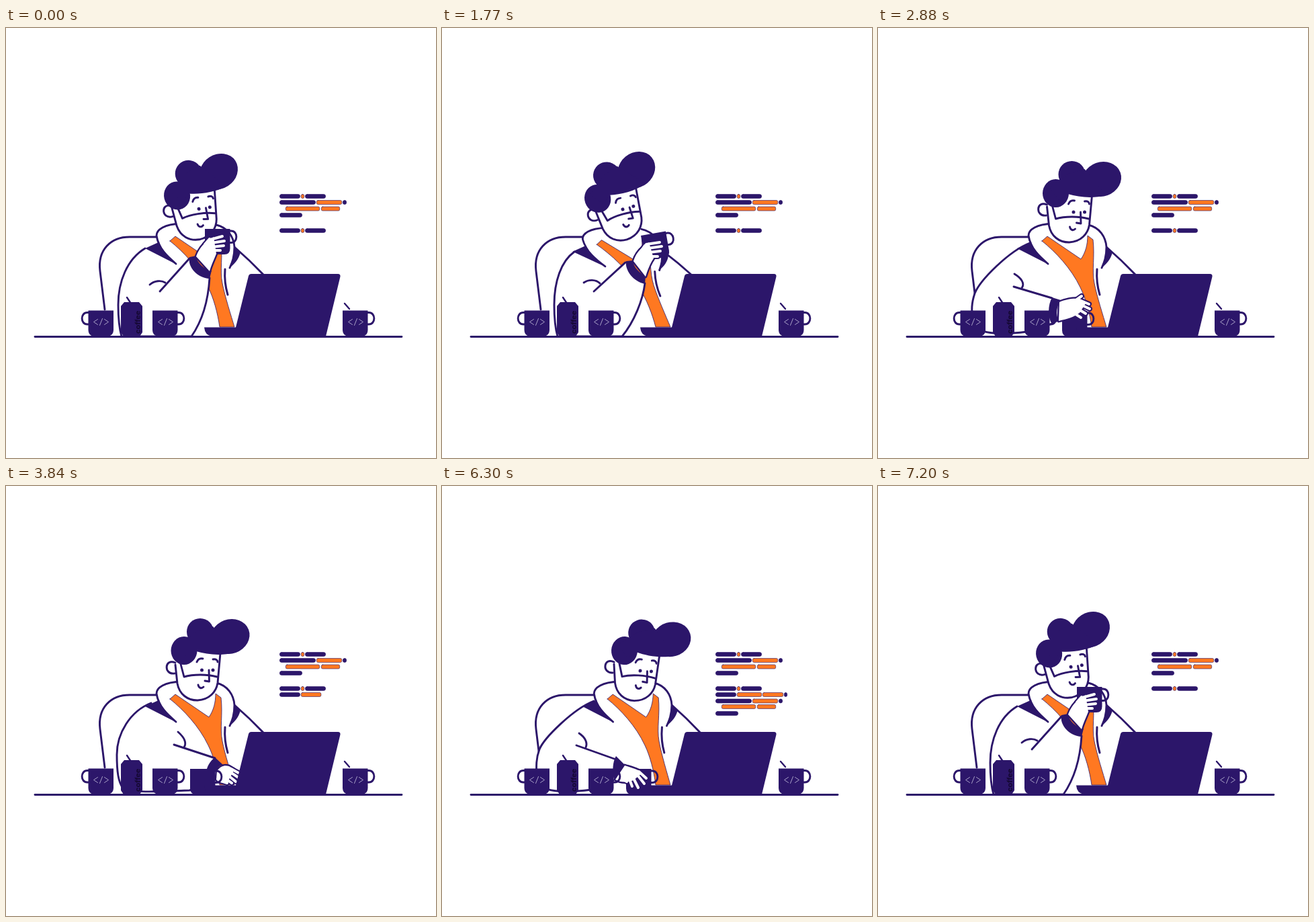
These frames come from a looping animation (640x640 px, 7.23 s). An HTML page with a canvas:

```html
<!DOCTYPE html>
<html lang="en">
<head>
<meta charset="utf-8">
<title>Coffee and code</title>
<style>
  html, body { margin: 0; width: 100%; height: 100%; overflow: hidden; background: #fff; }
  canvas { display: block; width: 640px; height: 640px; }
</style>
</head>
<body>
<canvas id="stage" width="640" height="640"></canvas>
<script>
const LOOP = 7230;
const NAVY = '#2c166a', ORANGE = '#ff7821', WHITE = '#fff';
const ctx = document.getElementById('stage').getContext('2d');

// Place: hair x y angle, face x y angle, mug x y angle, lean x y
const sip = {
  place: '281 226 -13 295.5 268 -9 296 299 0 0 0',
  sleeve: 'M207 328 C180 344 167 378 167 412 C167 430 168 445 172 459 C200 459 240 459 276 459 C292 436 301 405 303 372 L273 343 L229 392',
  crease: 'M214 382 C221 376 231 375 237 379',
  cuff: 'M273 341 C270 356 285 372 303 373 L306 361 C294 359 284 349 283 339 Z',
  palm: 'M283 340 C287 329 293 322 300 317 L309 311 L313 336 C309 346 305 354 303 362 Z',
  fingers: 'M304 315 L322 310 M305 320 L325 317 M306 326 L324 324 M308 331 L319 331 M296 322 L303 314'
};
const leanBack = {
  place: '255 227.5 -19.5 277 267.5 -16 296 309 -10 -13 5',
  sleeve: 'M197 333 C177 347 167 378 167 412 C167 430 168 445 172 459 C200 459 240 459 268 459 C286 437 299 405 302 380 L273 349 L226 392',
  crease: 'M211 379 C218 374 229 374 235 380',
  cuff: 'M274 347 C272 360 284 377 302 381 L303 369 C295 366 285 356 284 346 Z',
  palm: 'M285 347 C288 337 293 331 299 326 L308 319 L315 343 C310 350 306 360 303 370 Z',
  fingers: 'M304 322 L324 319 M306 328 L327 325 M308 334 L325 332 M311 340 L321 340 M297 331 L302 324'
};
const putDown = {
  place: '295.5 229 0 299.5 274 0 274 421 0 0 0',
  sleeve: 'M226 320 C195 332 152 375 144 395 C139 410 139 418 141 440 C150 458 190 456 222 452 C238 449 248 444 259 440 L259 402 L202 385',
  crease: 'M203 366 C213 372 219 380 214 387',
  cuff: 'M259 401 C253 412 252 430 259 441 L269 436 C264 426 266 413 272 405 Z',
  palm: 'M270 408 C278 404 290 402 299 403 L309 410 L300 424 C292 430 282 433 269 436 Z',
  fingers: 'M300 405 L314 411 M298 410 L315 418 M294 416 L309 425 M288 422 L302 431 M296 404 L303 399'
};
const type = {
  place: '296 228 0 300 274 0 274 421 0 0 0',
  sleeve: 'M216 323 C185 335 165 368 165 400 C165 425 167 440 174 450 C190 458 240 454 273 453 C285 450 294 440 300 428 L311 405 L250 385',
  crease: 'M256 366 C264 373 270 381 265 389',
  cuff: 'M311 404 C303 410 299 418 298 426 L312 425 C314 420 317 416 323 415 Z',
  palm: 'M314 424 C320 416 326 415 332 417 L340 422 L330 440 C322 443 316 441 313 437 Z',
  fingers: 'M335 421 L346 427 M334 426 L346 434 M331 431 L342 440 M326 435 L336 442 M320 439 L329 442'
};
const reach = {
  place: '303.5 230 3.5 303.5 275.5 3 274 421 0 2 0',
  sleeve: 'M226 320 C195 332 152 375 145 392 C140 405 140 415 141 440 C150 458 190 456 222 452 C238 450 245 445 255 438 L259 407 L200 386',
  crease: 'M204 368 C213 374 217 382 214 389',
  cuff: 'M259 402 C254 410 253 425 256 438 L264 433 C264 425 266 419 272 415 Z',
  palm: 'M272 416 C278 418 286 420 292 423 L297 428 L285 438 C277 441 267 442 258 437 Z',
  fingers: 'M293 425 L304 435 M290 429 L301 443 M284 433 L292 449 M278 434 L283 447 M268 435 L275 440'
};

const steps = [
  [0, sip], [120, sip], [720, leanBack], [1740, leanBack], [2240, sip], [2300, sip],
  [2850, putDown], [2930, putDown], [3450, type], [5850, type],
  [6280, reach], [6340, reach], [7080, sip], [LOOP, sip]
];

const clamp = v => Math.max(0, Math.min(1, v));
const ease = k => (1 - Math.cos(Math.PI * k)) / 2;
const NUM = /-?\d+(\.\d+)?/g;

function mix(a, b, k) {
  const ends = b.match(NUM);
  let i = 0;
  return a.replace(NUM, v => (+v + (ends[i++] - v) * k).toFixed(3));
}

function poseAt(t) {
  const i = Math.max(1, steps.findIndex(s => s[0] > t));
  const [t0, a] = steps[i - 1], [t1, b] = steps[i];
  const k = ease((t - t0) / (t1 - t0));
  const pose = {};
  for (const part in a) pose[part] = mix(a[part], b[part], k);
  return pose;
}

function fill(d, color) {
  ctx.fillStyle = color;
  ctx.fill(new Path2D(d));
}
function line(d, w = 2.9, color = NAVY) {
  ctx.strokeStyle = color;
  ctx.lineWidth = w;
  ctx.stroke(new Path2D(d));
}
function dot(x, y, rx, ry = rx, turn = 0) {
  ctx.fillStyle = NAVY;
  ctx.beginPath();
  ctx.ellipse(x, y, rx, ry, turn, 0, 7);
  ctx.fill();
}
function at(x, y, deg, draw, flip = 1) {
  ctx.save();
  ctx.translate(x, y);
  ctx.rotate(deg * Math.PI / 180);
  ctx.scale(flip, 1);
  draw();
  ctx.restore();
}
// Shear the upper body while the desk end stays put
function lean(dx, dy, draw) {
  const k = dx / 120, m = dy / 120;
  ctx.save();
  ctx.transform(1, 0, -k, 1 - m, 445 * k, 445 * m);
  draw();
  ctx.restore();
}

function mug() {
  fill('M0 0 H37.5 V29 Q37.5 38 29 38 H9 Q0 38 0 29 Z', NAVY);
  line('M37 3 H39 C49.5 3 49.5 20.5 39 20.5 H36');
}
function codeMug(x, flip) {
  at(flip < 0 ? x + 38 : x, 420.5, 0, mug, flip);
  at(x + 19.5, 437.5, 0, () => line('M-5 -4 L-11 0 L-5 4 M2 -5 L-2 5 M5 -4 L11 0 L5 4', 1, '#a79fc6'));
}

function can() {
  line('M180 401 L186 410', 2.4);
  fill('M176 408 H198 L203 414 V453 L199 459 H175 L171 453 V414 Z', NAVY);
  at(199.5, 455, -90, () => {
    ctx.fillStyle = '#150833';
    ctx.font = 'bold 11px Inter, sans-serif';
    ctx.fillText('coffee', 0, 0);
  });
}

const HEAD = [[407, 438], [439, 444, 1], [445, 476]];
const CALL = [[407, 461], [462, 500, 1], [501, 507]];
const ARGS = [[416, 467, 1], [469, 497, 1]];
const END = [[407, 441]];
const LONG = [[407, 438], [439, 476, 1], [477, 508, 1], [509, 514]];

function row(y, bars, width = 999) {
  const limit = bars[0][0] + width;
  for (const [x0, x1, warm] of bars) {
    const w = Math.min(x1, limit) - x0;
    if (w < 1) continue;
    ctx.beginPath();
    ctx.roundRect(x0 + .3, y - 3, Math.max(.4, w - .6), 6, Math.min(warm ? 2 : 3, w / 2));
    ctx.fillStyle = warm ? ORANGE : NAVY;
    ctx.fill();
    ctx.strokeStyle = NAVY;
    ctx.lineWidth = .6;
    ctx.stroke();
  }
}
function code(t) {
  row(250.5, HEAD);
  row(259.5, CALL);
  row(269, ARGS);
  row(278.5, END);
  row(301.5, HEAD);
  let left = Math.min(323, Math.max(0, (t - 3473) * .169));
  if (t > 6600) left *= 1 - clamp((t - 6600) / 450);
  for (const [y, bars] of [[310.5, LONG], [320, CALL], [328.5, ARGS], [338.5, END]]) {
    row(y, bars, left);
    left = Math.max(0, left - (bars[bars.length - 1][1] - bars[0][0]));
  }
}

function torso() {
  const hood = 'M260 291 C236 292 224 300 224 309 C227 328 240 340 253 351 L333 357 C336 350 340 342 340 326 C339 311 330 297 313 293';
  fill(hood, WHITE);
  const shirt = 'M244 317 L252 310 L302 344 C309 334 312 322 312 309 L320 315 C323 340 318 360 322 380 C326 400 335 428 340 445 L318 445 C315 424 309 402 301 386 C287 357 264 333 244 317 Z';
  fill(shirt, ORANGE);
  line(shirt, .8);
  line('M260 291 C236 292 224 300 224 309 C227 328 240 340 253 351');
  line('M313 293 C330 297 339 311 340 326 C340 342 336 350 333 357');
  line('M326 359 C325 372 327 387 330 397', 3);
}
function patches() {
  fill('M207 328 L228 318.5 C232 332 241 342 254 352 Z', NAVY);
  fill('M340 326 L349 334 C346 345 341 350 333 357 C338 346 341 336 340 326 Z', NAVY);
}

function face() {
  const ear = 'M-48 -11 C-64 -18 -66 7 -49 5';
  fill(ear, WHITE);
  line(ear);
  const jaw = 'M-48 -8 L-45 20 C-42 36 -30 45 -15 45 C3 44 13 32 15 19 L19 -25';
  fill(jaw, WHITE);
  line(jaw);
  line('M-40 -9 L-35 10 C-22 6 0 6 14 10');
  line('M2 0 L2.5 17 L-4 16');
  line('M-16 -12 C-14 -17 -11 -18 -7 -17 M8 -16 C12 -17 15 -15 15 -12');
  line('M-14 22 C-13 27 -9 28 -6 25');
  dot(-8.5, 0, 2.5);
  dot(8, 0, 2.5);
}
function hair() {
  dot(-31, 17, 19.5, 21);
  dot(-7, -11, 20);
  dot(37.5, -4, 29.5, 25.5, -.35);
  fill('M-40 8 L-12 -12 L12 -19 L44 20 C24 25 4 23 -13 18 L-26 28 Z', NAVY);
}

function hand(p) {
  line(p.palm, 4.8);
  line(p.fingers, 8);
  line(p.fingers, 4, WHITE);
  fill(p.palm, WHITE);
}

function laptop() {
  fill('M295 445.5 H342 L361 369 Q362 366 365 366 H494 Q498 366 497.5 370 L476 459 H306 Q296 457 295 445.5 Z', NAVY);
}

function draw(t) {
  const p = poseAt(t);
  const [hx, hy, ha, fx, fy, fa, mx, my, ma, lx, ly] = p.place.split(' ').map(Number);
  const typing = t > 3780 && t < 5640;
  const bob = t > 3840 && t < 5280 ? -2 * Math.sin(Math.PI * (t - 3840) / 720) ** 2 : 0;
  const tap = typing ? Math.sin((t - 3840) / 45) * clamp((5640 - t) / 200) : 0;

  ctx.fillStyle = WHITE;
  ctx.fillRect(0, 0, 640, 640);
  ctx.lineCap = ctx.lineJoin = 'round';

  line('M147 419 L140 362 C136 330 156 311 184 311 H228');
  code(t);

  lean(lx, ly, () => {
    line('M340 326 Q362 345 383 367');
    torso();
  });
  at(fx, fy + bob, fa, face);
  at(hx, hy + bob, ha, hair);

  fill(p.sleeve, WHITE);
  const cut = p.sleeve.split('L');
  line(cut[0]);
  line('M' + cut[1] + 'L' + cut[2]);
  line(p.crease);
  lean(lx, ly, patches);
  fill(p.cuff, NAVY);

  const parts = [() => at(mx, my, ma, mug), () => at(0, tap, 0, () => hand(p))];
  if (t > 2930 && t < 6050) parts.reverse();
  parts.forEach(part => part());

  laptop();
  codeMug(122, -1);
  can();
  codeMug(218, 1);
  line('M504 410 L511 418', 2.4);
  codeMug(501, 1);
  line('M43 459.5 H589', 2.8);
}

function tick() {
  draw(performance.now() % LOOP);
  requestAnimationFrame(tick);
}
tick();
</script>
</body>
</html>
```
